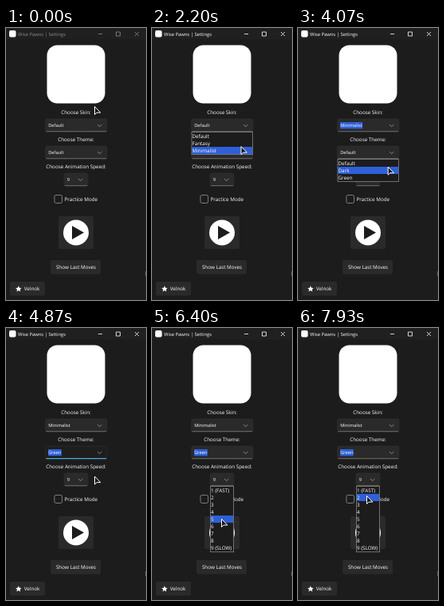
An HTML page for the animation above (8 s loop, 176x341 px).

```html
<!DOCTYPE html>
<html lang="en">
<head>
<meta charset="utf-8">
<title>Settings</title>
<style>
  html, body { margin: 0; width: 100%; height: 100%; overflow: hidden; background: #1c1c1c; }
  svg { display: block; width: 100vw; height: 100vh; }
  text { font: 500 6.3px "Open Sans", "Noto Sans", sans-serif; fill: #fff; text-rendering: geometricPrecision; }
  .mid { text-anchor: middle; }
  .field { font-size: 5.7px; }
  .button { fill: #2a2a2a; }
  .line { fill: none; stroke-width: .8; }
</style>
</head>
<body>
<svg id="stage" viewBox="0 0 176 341">
  <rect width="176" height="341" fill="#1c1c1c"/>
  <rect width="176" height="14" fill="#202020"/>
  <rect x="175" y="305" width="1" height="6" fill="#5a5a5a"/>
  <rect x="4" y="3" width="8.5" height="8.5" rx="2" fill="#fff"/>
  <g id="titlebar">
    <text x="15" y="9.8" style="font-size:5.85px;fill:inherit">Wise Pawns | Settings</text>
    <path class="line" stroke="currentColor" d="M116 7.5h5M138.5 5h5v5h-5zM162 5l5 5m0-5l-5 5"/>
  </g>

  <rect x="51.5" y="21.5" width="73" height="73" rx="13" fill="#fff"/>
  <text class="mid" x="88" y="107.8">Choose Skin:</text>
  <text class="mid" x="88" y="141.8">Choose Theme:</text>
  <text class="mid" x="88" y="175.9">Choose Animation Speed:</text>

  <g id="combos"></g>

  <rect class="line" x="60.9" y="209.5" width="9.6" height="10" rx="2" stroke="#969696"/>
  <text x="73.5" y="217">Practice Mode</text>

  <rect class="button" x="66" y="236" width="44" height="41" rx="2"/>
  <circle cx="88" cy="256.5" r="16" fill="#fff"/>
  <path d="M83 248v17l15-8.5z" fill="#1c1c1c"/>

  <rect class="button" x="56" y="291" width="63" height="17.5" rx="2"/>
  <text class="mid" x="88" y="302.4">Show Last Moves</text>

  <rect class="button" x="5" y="318" width="44" height="17.5" rx="2"/>
  <path id="star" fill="#fff"/>
  <text x="22.7" y="329.4">Velnok</text>

  <g id="lists"></g>
  <path id="cursor" d="M.5.5v10l2.6-2.4h4.7z" fill="#151515" stroke="#fff" stroke-linejoin="round"/>
</svg>

<script>
const LOOP = 8000, ROW = 9.05;
const $ = id => document.getElementById(id);

function add(parent, tag, attrs, content = '') {
  const node = document.createElementNS('http://www.w3.org/2000/svg', tag);
  for (const key in attrs) node.setAttribute(key, attrs[key]);
  node.textContent = content;
  return parent.appendChild(node);
}

const show = (node, visible) => node.setAttribute('visibility', visible ? 'visible' : 'hidden');
const during = (t, [from, to]) => t >= from && t < to;

function makeCombo({ x, y, width, items, ...times }) {
  const box = $('combos'), popup = add($('lists'), 'g', {});
  const back = add(box, 'rect', { x, y, width, height: 16, rx: 2, stroke: '#303030', 'stroke-width': .6 });
  const underline = add(box, 'rect', { x: x + .8, y: y + 15.2, width: width - 1.6, height: 1 });
  const mark = add(box, 'rect', { x: x + 3.5, y: y + 4, height: 8.3, fill: '#2f60d8' });
  const value = add(box, 'text', { x: x + 3.7, y: y + 10.4, class: 'field' });
  add(box, 'path', { class: 'line', stroke: '#a0a0a0', d: `M${x + width - 12} ${y + 7}l2.7 2.6 2.7-2.6` });

  const top = y + 16.9;
  add(popup, 'rect', { x: x + .4, y: top - .4, width: width - .8, height: items.length * ROW + .8,
    fill: '#1c1c1c', stroke: '#858585', 'stroke-width': .8 });
  const bar = add(popup, 'rect', { x: x + .9, width: width - 1.8, height: ROW, fill: '#2f60d8' });
  items.forEach((item, i) =>
    add(popup, 'text', { x: x + 1, y: top + i * ROW + 6.8 }, item));

  return { top, items, popup, back, underline, mark, value, bar, ...times };
}

function updateCombo(combo, t, pointerY) {
  const { top, items, popup, back, underline, mark, value, bar, open, focus, selected } = combo;
  const row = Math.floor((pointerY + 1.2 - top) / ROW);
  bar.setAttribute('y', top + Math.max(0, Math.min(items.length - 1, row)) * ROW);
  show(popup, during(t, open));

  const focused = during(t, focus);
  back.setAttribute('fill', focused ? '#1e1e1e' : '#2a2a2a');
  underline.setAttribute('fill', focused ? '#57c8ff' : '#6c6c6c');
  value.textContent = t < open[1] ? combo.initial : combo.chosen;
  show(mark, during(t, selected));
  mark.setAttribute('width', value.getComputedTextLength() + .6);
}

const combos = [
  { x: 49.5, y: 114, width: 77.5, items: ['Default', 'Fantasy', 'Minimalist'],
    initial: 'Default', chosen: 'Minimalist',
    open: [1130, 2930], focus: [2930, 3330], selected: [2930, 4870] },
  { x: 49.5, y: 148, width: 77.5, items: ['Default', 'Dark', 'Green'],
    initial: 'Default', chosen: 'Green',
    open: [3330, 4870], focus: [4870, 5670], selected: [4870, LOOP] },
  { x: 73, y: 182, width: 30,
    items: ['1 (FAST)', '2', '3', '4', '5', '6', '7', '8', '9 (SLOW)'],
    initial: '9', chosen: '9',
    open: [5670, LOOP], focus: [0, 0], selected: [0, 0] }
].map(makeCombo);

// Pointer stops: time, x, y
const path = [
  [0, 111, 98], [270, 118, 131], [400, 120.5, 124], [1270, 120.5, 124],
  [1930, 113, 151], [2070, 113, 151], [2200, 111.5, 148], [2270, 111, 145],
  [2400, 111, 145], [2600, 112, 149], [3070, 112, 149], [3330, 115.5, 152],
  [3470, 115.5, 152], [4330, 111.5, 183], [4400, 111, 185.5], [5330, 111, 185.5],
  [5530, 95, 190], [5800, 95, 190], [6400, 87, 239], [6670, 84, 258],
  [7130, 84, 273], [7530, 84, 244], [7930, 86, 210], [LOOP, 86, 210]
];

function pointerAt(t) {
  const i = path.findIndex(stop => stop[0] > t);
  const [t0, x0, y0] = path[i - 1], [t1, x1, y1] = path[i];
  const k = (t - t0) / (t1 - t0);
  return [x0 + (x1 - x0) * k, y0 + (y1 - y0) * k];
}

const starPoints = Array.from({ length: 10 }, (_, i) => {
  const angle = i * Math.PI / 5, r = i % 2 ? 1.9 : 4;
  return [15.8 + r * Math.sin(angle), 327.2 - r * Math.cos(angle)];
});
$('star').setAttribute('d', `M${starPoints.join('L')}z`);

// The screen updates 15 times a second, on times rounded to 10 ms
function screenTime(elapsed) {
  const step = Math.floor((elapsed % LOOP + 4) * .015);
  return Math.round(step / .15) * 10 % LOOP;
}

function draw(elapsed) {
  const t = screenTime(elapsed);
  const [x, y] = pointerAt(t);
  const titleColor = t < 1130 ? '#8c8c8c' : '#fff';
  $('titlebar').setAttribute('fill', titleColor);
  $('titlebar').setAttribute('color', titleColor);
  $('cursor').setAttribute('transform', `translate(${x} ${y})`);
  combos.forEach(combo => updateCombo(combo, t, y));
}

let start;
function tick(now) {
  start ??= now;
  draw(now - start);
  requestAnimationFrame(tick);
}
draw(0);
requestAnimationFrame(tick);
</script>
</body>
</html>
```
